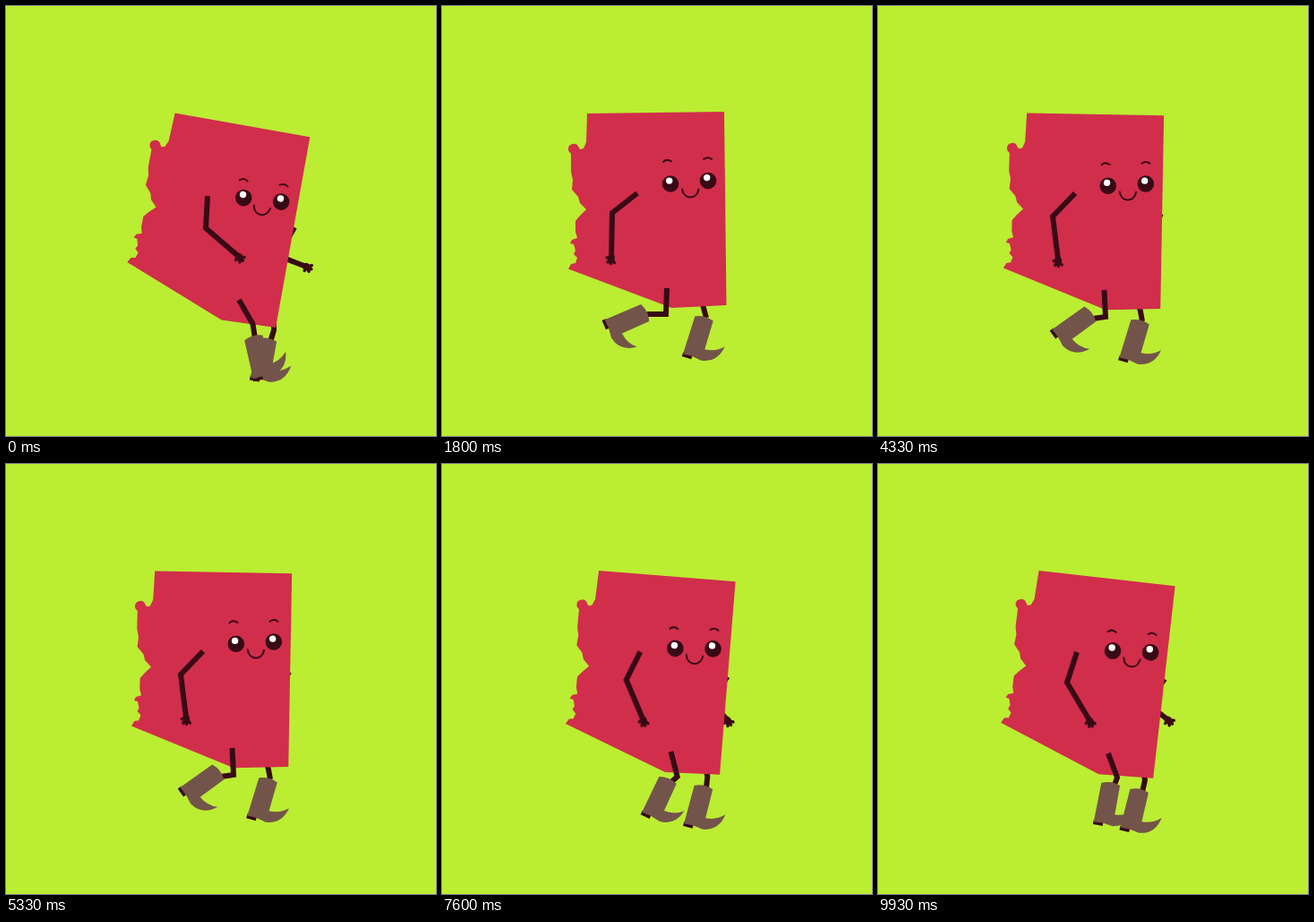
These frames come from a looping animation (480 by 480 pixels, 9.99 s). An HTML page:

```html
<!DOCTYPE html>
<html lang="en">
<head>
<meta charset="utf-8">
<title>Walking shape</title>
<style>
  html, body { margin: 0; width: 100%; height: 100%; overflow: hidden; background: #bbed33; }
  svg { display: block; width: 100vw; height: 100vh; }
  .limb { fill: none; stroke: #380a15; stroke-width: 6; }
  .finger { fill: none; stroke: #380a15; stroke-width: 3.4; stroke-linecap: round; }
  .line { fill: none; stroke: #380a15; stroke-width: 2; stroke-linecap: round; }
  .dark { fill: #380a15; }
</style>
</head>
<body>
<svg viewBox="0 0 480 480">
  <defs>
    <g id="boot">
      <path class="dark" d="M-11 44H0V49H-11Z"/>
      <path fill="#73544a" d="M-10.5 2Q0 -3 10.5 1L11 34Q23 33.5 31.5 24.5Q29 44 11 47L0 45.5L-10.6 46Z"/>
    </g>
    <g id="hand">
      <circle class="dark" cx="1" r="4"/>
      <path class="finger" d="M1 0L6.5 -3.5M1 0L7.5 0.5M1 0L6 4M1 0L1 5"/>
    </g>
    <g id="eye">
      <circle class="dark" r="9.3"/>
      <circle cx="-1.3" cy="-3.4" r="3.7" fill="#fff"/>
    </g>
  </defs>

  <path id="farArm" class="limb"/>
  <use id="farHand" href="#hand"/>
  <path id="farLeg" class="limb"/>

  <g id="body">
    <path fill="#d12e4c" d="M162 120L315 118L317.5 334L256.5 337L141 293.5L144 288L149 287L151 281L147 277L149 273L147 266L143 265L145 261L151 259L149 252L149 240L154 234L161 227L154 220L152 213L145 205L146 194L144 185L144 165Q139 161 142 156Q147 152 151 155L154 160L158 159L161 152Z"/>
    <use href="#eye" x="255" y="198.5"/>
    <use href="#eye" x="297" y="195"/>
    <path id="brows" class="line" d="M247 174Q251 170 256 173.5M292 171Q297 167.5 301 171"/>
    <path class="line" d="M268 204.5C270 216.5 284.5 216.5 286.5 204.5"/>
  </g>

  <path id="nearArm" class="limb"/>
  <use id="nearHand" href="#hand"/>
  <path id="nearLeg" class="limb"/>
  <use id="farBoot" href="#boot"/>
  <use id="nearBoot" href="#boot"/>
</svg>
<script>
const FPS = 15, LOOP = 9990, STRIDE = 7.5;

// Key poses along the swing: u = 0 leaning forward, u = 1 leaning back
const poses = [
  { u: 0, tilt: [10.85], brows: [0, 6, 0],
    nearArm: [225, 212, 223, 248, 259, 279], farArm: [322, 247, 304, 279, 334, 290.5],
    nearLeg: [260, 328, 275.5, 355, 278, 371], nearBoot: [276, 369, -13],
    farLeg: [299, 348, 299, 362, 295, 375], farBoot: [292, 371.5, 11] },
  { u: 4 / 15, tilt: [7.15], brows: [0, 4, 0],
    nearArm: [222, 210, 211, 244, 236, 286], farArm: [320, 240, 300, 267, 323, 285],
    nearLeg: [257, 323, 267, 350, 264, 358], nearBoot: [260, 356, 11],
    farLeg: [296, 340, 298, 353, 295, 366], farBoot: [292, 363.5, 14] },
  { u: 10 / 15, tilt: [1.7], brows: [0, 1.2, 0],
    nearArm: [220, 209, 195, 235, 201, 283], farArm: [316, 232, 300, 260, 308, 286],
    nearLeg: [252.5, 317, 254, 347, 240, 349], nearBoot: [238, 343, 54.5],
    farLeg: [290, 331, 293, 341, 295, 352], farBoot: [293, 351.5, 17] },
  { u: 12 / 15, tilt: [0], brows: [0, 0, 0],
    nearArm: [218, 209, 190, 231, 189, 280], farArm: [313, 228, 298, 255, 300, 284],
    nearLeg: [251, 315, 250, 344, 229, 344], nearBoot: [228, 342, 67],
    farLeg: [289, 327, 292, 337, 295, 348], farBoot: [293, 347.5, 17.5] }
];

const $ = id => document.getElementById(id);
const move = (id, [x, y, a]) =>
  $(id).setAttribute("transform", `translate(${x} ${y}) rotate(${a})`);
const line = (id, p) => $(id).setAttribute("d", "M" + p.join(" "));

function arm(side, p) {
  const angle = Math.atan2(p[5] - p[3], p[4] - p[2]) * 180 / Math.PI;
  line(side + "Arm", p);
  move(side + "Hand", [p[4], p[5], angle]);
}

// Linear between poses; the last segment carries on past its end
function poseAt(u) {
  let i = 0;
  while (i < poses.length - 2 && u >= poses[i + 1].u) i++;
  const a = poses[i], b = poses[i + 1], k = (u - a.u) / (b.u - a.u);
  return key => a[key].map((v, n) => v + (b[key][n] - v) * k);
}

function draw(ms) {
  const step = Math.floor((ms % LOOP + 4) * FPS / 1000);
  const phase = step % STRIDE / STRIDE;
  const at = poseAt(1 - Math.abs(1 - 2 * phase));
  $("body").setAttribute("transform", `rotate(${at("tilt")[0]} 178 260)`);
  move("brows", at("brows"));
  for (const side of ["near", "far"]) {
    arm(side, at(side + "Arm"));
    line(side + "Leg", at(side + "Leg"));
    move(side + "Boot", at(side + "Boot"));
  }
}

const start = performance.now();
function tick() {
  draw(performance.now() - start);
  requestAnimationFrame(tick);
}
tick();
</script>
</body>
</html>
```
